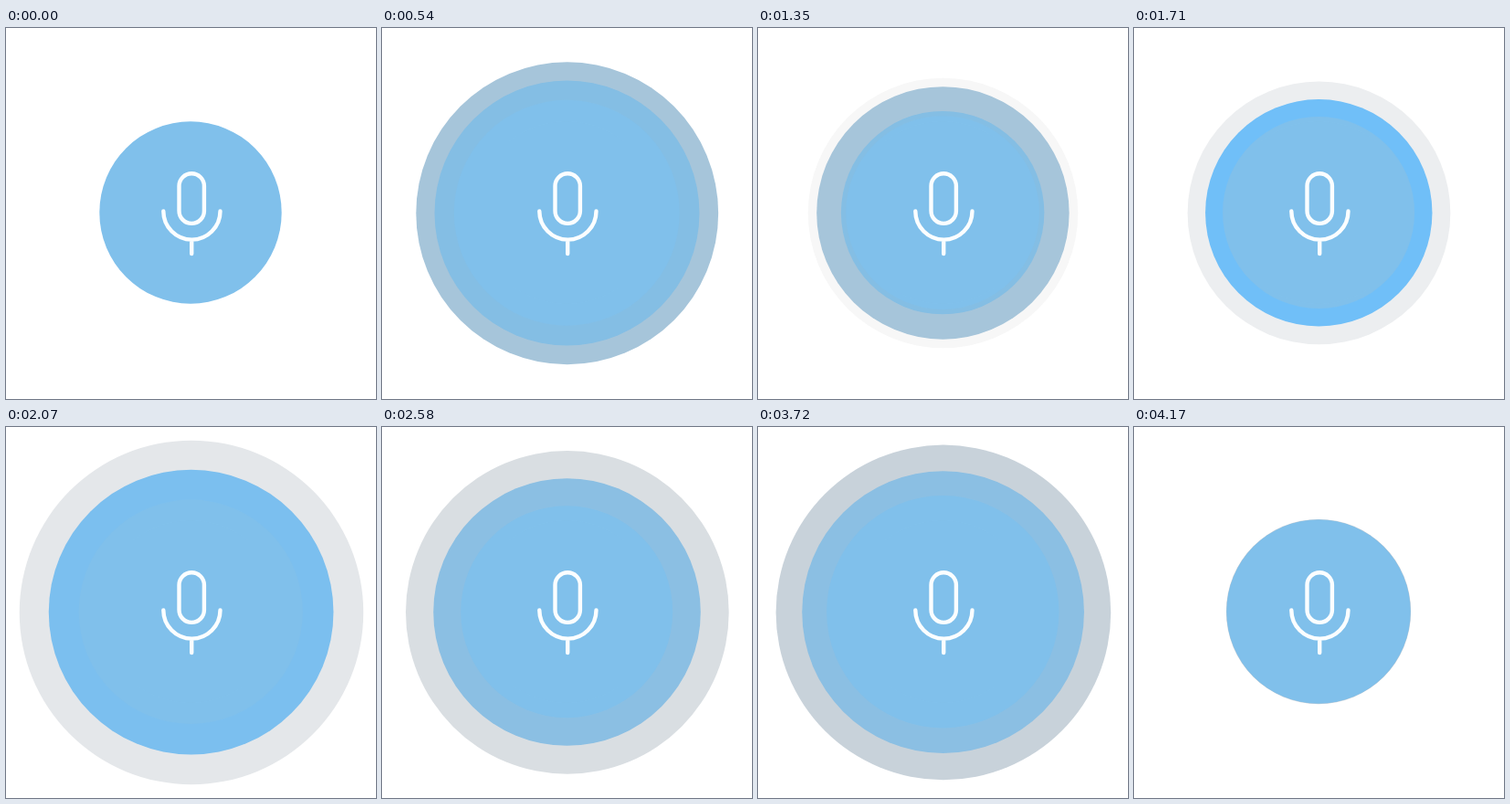
Write an HTML page that moves like this. It is 405 px wide and 406 px high and loops after 4.2 s.

```html
<!DOCTYPE html>
<html lang="en">
<head>
<meta charset="utf-8">
<title>Voice pulse</title>
<style>
  html, body { margin: 0; width: 100%; height: 100%; overflow: hidden; background: #fff; }
  svg { display: block; width: 405px; height: 406px; }
  .mic { fill: none; stroke: #fbfeff; stroke-width: 4.4; stroke-linecap: round; }
</style>
</head>
<body>
<svg viewBox="0 0 405 406">
  <g id="ripples"></g>
  <circle cx="202" cy="202" r="99.7" fill="#80c0eb"/>
  <g class="mic">
    <rect x="189.5" y="159.3" width="27.4" height="54.6" rx="13.7"/>
    <path d="M172.3 200.5a31.1 31.1 0 0 0 62.2 0M203.2 232v15"/>
  </g>
</svg>
<script>
  const LOOP = 4200, STEP = 30, BASE = 100, BLUE = 0x80c0eb;

  // A ripple swells from the button and sinks back along half a sine wave,
  // reaching its peak (px beyond the button) in the middle of its span (ms).
  const ripple = (middle, span, peak, from, to = from) => ({ middle, span, peak, from, to });

  // Back to front: faint halos, then the outer, mid and inner ring of the three beats.
  const ripples = [
    ripple(270, 540, 75, 0xc4d4de, 0xffffff),
    ripple(1050, 900, 95.5, 0xf7f7f7),

    ripple(856, 1395, 86.4, 0xa6c5da),
    ripple(2262, 1590, 95, 0xf1f2f4, 0xcfd5da),
    ripple(3525, 1300, 93.5, 0xc8d2da),

    ripple(795, 1275, 55.6, 0x84bee4),
    ripple(2253, 1472, 60.4, 0x6abffd, 0x98bfd9),
    ripple(3525, 1300, 61, 0x8bbfe3),

    ripple(795, 1275, 29, BLUE),
    ripple(2240, 1217, 25, BLUE),
    ripple(3525, 1300, 30.5, BLUE)
  ];

  function mix(a, b, u) {
    const part = shift => {
      const x = a >> shift & 255, y = b >> shift & 255;
      return Math.round(x + (y - x) * u);
    };
    return `rgb(${part(16)},${part(8)},${part(0)})`;
  }

  const group = document.getElementById("ripples");
  for (const item of ripples) {
    item.node = document.createElementNS("http://www.w3.org/2000/svg", "circle");
    group.append(item.node);
  }

  function draw(t) {
    for (const { node, middle, span, peak, from, to } of ripples) {
      const u = (t - middle) / span + 0.5;
      const active = u > 0 && u < 1;
      const swell = active ? peak * Math.sin(Math.PI * u) : 0;
      const centre = 202 + swell * 0.011; // the scaling origin sits slightly off centre
      node.setAttribute("cx", centre);
      node.setAttribute("cy", centre);
      node.setAttribute("r", active ? BASE + swell : 0);
      if (active) node.setAttribute("fill", mix(from, to, u));
    }
  }

  const start = performance.now();
  function tick() {
    const t = (performance.now() - start) % LOOP;
    draw(Math.floor(t / STEP) * STEP);
    requestAnimationFrame(tick);
  }
  draw(0);
  requestAnimationFrame(tick);
</script>
</body>
</html>
```
